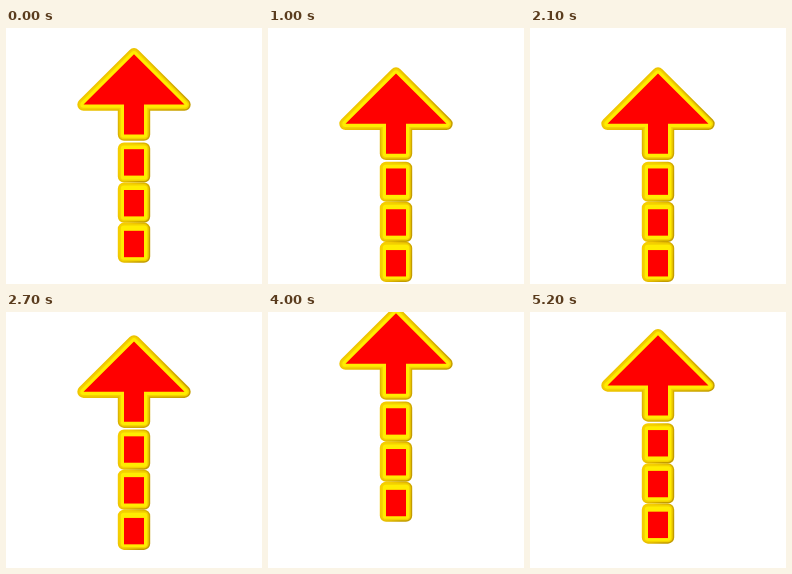
Animation of 256x256 px, one loop 5.3 s. Source, as an HTML page:

```html
<!DOCTYPE html>
<html lang="en">
<head>
<meta charset="utf-8">
<title>Bobbing arrow</title>
<style>
  html, body { margin: 0; width: 100%; height: 100%; overflow: hidden; background: #fff; }
  svg { display: block; width: 100vw; height: 100vh; }
  path { fill: none; stroke-linejoin: round; }
  .edge { stroke: url(#shade); stroke-width: 12.4; }
  .slope { stroke: #f3d200; stroke-width: 9.4; }
  .ridge { stroke: #ffec00; stroke-width: 6.4; }
  .face { fill: #f00; }
</style>
</head>
<body>
<svg viewBox="0 0 256 256">
  <defs>
    <linearGradient id="shade" x1="0" y1="0.2" x2="1" y2="0.8">
      <stop offset="0" stop-color="#f6cc00"/>
      <stop offset="0.5" stop-color="#e2b900"/>
      <stop offset="1" stop-color="#c39c00"/>
    </linearGradient>
  </defs>
  <g id="arrow"></g>
</svg>
<script>
  const LOOP = 5300, HOLD = 400, STEP = 100, STEPS = 50;
  const REST = 20, SWING = 25;
  const arrow = document.getElementById('arrow');

  // Shapes are placed with y = 0 at the outer tip of the arrow
  const head = 'M128 6.3 L178.5 56.6 H138 V86.6 H118 V56.6 H77.5 Z';
  const block = (y, height) => `M118 ${y} h20 v${height} h-20 Z`;

  function addPath(className, d) {
    const path = document.createElementNS('http://www.w3.org/2000/svg', 'path');
    path.setAttribute('class', className);
    path.setAttribute('d', d);
    arrow.append(path);
  }

  function addPiece(rim, face) {
    for (const layer of ['edge', 'slope', 'ridge']) addPath(layer, rim);
    addPath('face', face);
  }

  addPiece(head, head);
  for (let i = 0; i < 3; i++) {
    addPiece(block(100.6 + 40.1 * i, 27.8), block(101.2 + 40.8 * i, 26.4));
  }

  function draw(time) {
    const t = time % LOOP;
    const step = t < HOLD ? 0 : Math.floor((t - HOLD) / STEP) + 1;
    const y = REST + SWING * Math.sin(2 * Math.PI * step / STEPS);
    arrow.setAttribute('transform', `translate(0 ${y.toFixed(2)})`);
  }

  function tick() {
    draw(performance.now());
    requestAnimationFrame(tick);
  }
  tick();
</script>
</body>
</html>
```
